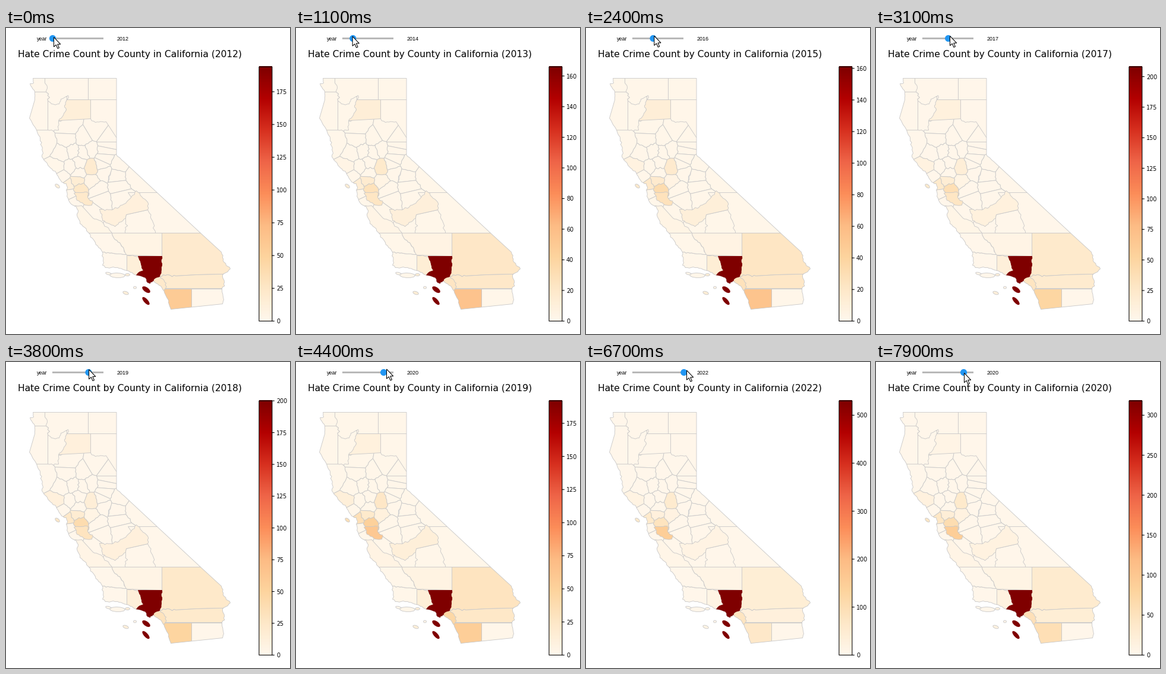
A matplotlib script that plays this animation: 478 by 514 pixels, repeating every 8000 ms.

```python
import numpy as np
import matplotlib.pyplot as plt
from matplotlib.animation import FuncAnimation
from matplotlib.patches import Circle, Polygon, Rectangle

W, H, DPI = 478, 514, 100
PX = 72 / DPI
FRAMES, INTERVAL = 80, 100
CMAP = plt.get_cmap("OrRd")
GREY = "#c9c9c9"
LINE = 0.62

fig = plt.figure(figsize=(W / DPI, H / DPI), dpi=DPI, facecolor="white")
ax = fig.add_axes([0, 0, 1, 1])
ax.axis("off")

# Counts at a few years; the ones between are interpolated.
PEAK_YEARS = [2012, 2014, 2017, 2019, 2020, 2021, 2022]
PEAKS = [194, 138, 208, 192, 318, 370, 530]
COUNT_YEARS = [2012, 2018, 2022]
COUNTS = {
    "San Diego": (57, 49, 66),
    "San Bernardino": (21, 24, 42),
    "Riverside": (20, 22, 30),
    "Orange": (22, 32, 78),
    "Ventura": (13, 13, 16),
    "Santa Clara": (22, 30, 148),
    "Alameda": (25, 40, 82),
    "Contra Costa": (16, 18, 30),
    "San Francisco": (12, 25, 60),
    "Sacramento": (19, 15, 55),
    "San Joaquin": (5, 6, 22),
    "Fresno": (11, 11, 18),
    "Shasta": (13, 11, 6),
    "Sonoma": (3, 11, 20),
    "Monterey": (4, 5, 10),
    "Kern": (6, 5, 14),
}


def roughen(points):
    """Let short edges wander; long ones are surveyed lines and stay straight."""
    points = np.round(np.asarray(points, float), 1)
    path = []
    for a, b in zip(points, np.roll(points, -1, axis=0)):
        length = np.hypot(*(b - a))
        t = np.linspace(0, 1, 2 + int(length / 3.5))[:-1, None]
        if length > 28 or length < 3:
            path.append(a[None])
            continue
        # The same edge must look alike from both sides.
        swap = tuple(a) > tuple(b)
        lo, hi = (b, a) if swap else (a, b)
        rng = np.random.default_rng(int(abs(lo @ (910, 70) + hi @ (130, 310))))
        s = np.linspace(0, 1, len(t) + 1)[:, None]
        normal = np.array([lo[1] - hi[1], hi[0] - lo[0]]) / length
        line = lo + s * (hi - lo) + normal * np.sin(np.pi * s) * rng.normal(0, 0.9, s.shape)
        path.append((line[::-1] if swap else line)[:-1])
    return np.vstack(path)


def voronoi_cell(center, centers):
    """Part of the stage nearer to center than to any other point."""
    cell = [np.array(p, float) for p in ((0, 0), (W, 0), (W, H), (0, H))]
    for other in centers:
        normal = other - center
        if not normal.any():
            continue
        side = [(p - (center + other) / 2) @ normal for p in cell]
        kept = []
        for i, p in enumerate(cell):
            q, d, e = cell[i - 1], side[i], side[i - 1]
            if d * e < 0:
                kept.append(q + (p - q) * e / (e - d))
            if d <= 0:
                kept.append(p)
        cell = kept
    return cell


state = ax.add_patch(Polygon(roughen([
    (45, 84), (185.5, 84), (185.5, 213), (200, 226), (327, 344), (362, 376),
    (365, 391), (377, 404), (364, 414), (367, 427), (363, 437), (366, 456),
    (364, 463), (277, 472), (272, 455), (262, 436), (247, 424), (242, 429),
    (236, 425), (234, 419), (220, 415), (203, 407), (180, 401), (170, 402),
    (162, 398), (163, 391), (162, 376), (146, 354), (140, 345), (124, 328),
    (119, 312), (121, 306), (118, 300), (110, 296), (105, 289), (101, 272),
    (103, 267), (101, 261), (93, 258), (84, 243), (70, 230), (60, 216),
    (62, 210), (57, 186), (51, 171), (39, 151), (48, 120), (48, 107),
    (40, 93), (46, 92)]), fill=False, ec=GREY, lw=LINE, zorder=3))
areas = []


def add_area(name, shape, on_land=True):
    patch = ax.add_patch(Polygon(shape, ec=GREY, lw=LINE, joinstyle="round", zorder=2))
    if on_land:
        patch.set_clip_path(state)
    if name == "Los Angeles":
        patch.set_zorder(4)
    areas.append((name, patch))


def county(name, *points):
    add_area(name, roughen(points))


def island(name, x, y, length, width, angle):
    turn, a = np.linspace(0, 2 * np.pi, 12)[:-1], np.radians(angle)
    u, v = length / 2 * np.cos(turn), width / 2 * np.sin(turn)
    add_area(name, np.c_[x + u * np.cos(a) - v * np.sin(a),
                         y + u * np.sin(a) + v * np.cos(a)], on_land=False)


# Small counties are cells around their centres.
CENTERS = {
    "Mendocino": (66, 195), "Lake": (94, 210), "Tehama": (105, 166),
    "Glenn": (104, 188), "Colusa": (112, 206), "Butte": (130, 186),
    "Plumas": (150, 174), "Sierra": (168, 187), "Nevada": (168, 195),
    "Placer": (166, 205), "Yuba": (141, 203), "Sutter": (130, 207),
    "El Dorado": (165, 218), "Amador": (160, 229), "Alpine": (190, 229),
    "Calaveras": (164, 242), "Tuolumne": (186, 248), "Mariposa": (188, 266),
    "Madera": (192, 283), "Merced": (160, 287), "Stanislaus": (154, 271),
    "San Joaquin": (143, 257), "Sacramento": (143, 234), "Yolo": (122, 227),
    "Solano": (121, 243), "Napa": (109, 233), "Sonoma": (85, 233),
    "Marin": (94, 250), "Contra Costa": (119, 257), "Alameda": (123, 269),
    "San Mateo": (106, 278), "San Francisco": (104, 264),
    "Santa Cruz": (113, 293), "San Benito": (145, 308),
    "Kings": (190, 328), "Mono": (216, 247),
}
spots = np.array(list(CENTERS.values()), float)
for name, spot in zip(CENTERS, spots):
    add_area(name, roughen(voronoi_cell(spot, spots)))

# Larger ones reach past the coast and are cut off by the state outline.
county("Trinity", (70, 115), (102, 115), (100, 152), (88, 156), (88, 171), (70, 171))
county("Siskiyou", (67, 70), (138, 70), (138, 120), (102, 120), (104, 113),
       (92, 119), (89, 127), (76, 127), (70, 122), (71, 110), (67, 107), (65, 92))
county("Modoc", (138, 70), (200, 70), (200, 120), (138, 120))
county("Del Norte", (20, 70), (67, 70), (65, 92), (69, 99), (67, 107), (20, 107))
county("Humboldt", (20, 107), (67, 107), (71, 110), (70, 122), (70, 171), (20, 171))
county("Shasta", (102, 120), (142, 120), (142, 152), (88, 155), (96, 146),
       (101, 137), (98, 130))
county("Lassen", (142, 120), (200, 120), (200, 183), (185, 183), (168, 157),
       (150, 158), (142, 152))
county("Santa Clara", (114, 277), (136, 275), (137, 284), (145, 290), (144, 297),
       (133, 297), (119, 289))
county("Inyo", (205, 276), (270, 276), (345, 344), (251, 344))
county("Tulare", (201, 319), (202, 313), (238, 305), (247, 326), (251, 344), (200, 344))
county("Fresno", (157, 304), (178, 305), (201, 294), (219, 273), (238, 292),
       (238, 305), (202, 313), (201, 319), (183, 333), (162, 323))
county("Monterey", (100, 300), (127, 298), (146, 319), (160, 324), (178, 344), (100, 344))
county("Santa Barbara", (140, 376), (162, 376), (180, 378), (203, 380), (203, 430), (140, 430))
county("San Luis Obispo", (120, 344), (178, 344), (183, 355), (191, 360),
       (203, 380), (180, 378), (162, 376), (130, 376))
county("Kern", (178, 344), (262, 344), (262, 383), (203, 381), (191, 360), (183, 355))
county("San Bernardino", (262, 344), (400, 344), (400, 412), (320, 414),
       (285, 416), (271, 414), (258, 417), (262, 383))
county("Imperial", (312, 437), (400, 437), (400, 500), (312, 500))
county("San Diego", (250, 437), (312, 437), (312, 500), (250, 500))
county("Riverside", (258, 417), (271, 414), (285, 416), (320, 414), (400, 412),
       (400, 437), (268, 437))
county("Orange", (250, 420), (258, 417), (269, 428), (268, 437), (262, 446), (240, 432))
county("Ventura", (203, 381), (222, 384), (228, 400), (235, 420), (203, 420))
county("Los Angeles", (222, 383), (262, 383), (261, 405), (258, 417), (250, 420),
       (246, 427), (242, 436), (215, 420), (222, 411), (231, 407), (228, 400))

island("San Francisco", 86, 265, 9, 5, 40)
island("Santa Barbara", 172, 412, 10, 4, 15)
island("Santa Barbara", 187, 415, 26, 8, 2)
island("Ventura", 204, 414, 8, 4, 0)
island("Ventura", 201, 444.5, 10, 5, 20)
island("Santa Barbara", 216.5, 435.5, 5, 4, 0)
island("Los Angeles", 235.5, 439, 15, 7, 36)
island("Los Angeles", 235, 458, 16, 6, 48)

# Colour bar
LEFT, RIGHT, TOP, BOTTOM = 425.4, 447.4, 64.7, 491.8
ax.imshow(np.linspace(1, 0, 256)[:, None], cmap=CMAP, aspect="auto",
          extent=(LEFT, RIGHT, BOTTOM, TOP))
ax.add_patch(Rectangle((LEFT, TOP), RIGHT - LEFT, BOTTOM - TOP, fill=False,
                       ec="black", lw=0.77, snap=False))
ticks = [(ax.plot([], [], color="black", lw=0.77, snap=False)[0],
          ax.text(0, 0, "", fontsize=9.7 * PX, va="center_baseline",
                  family="DejaVu Sans"))
         for _ in range(10)]
title = ax.text(208, 48.5, "", fontsize=15.5 * PX, ha="center",
                va="baseline", family="DejaVu Sans")

# Slider, pointer and busy ring
label = dict(fontsize=9 * PX, va="baseline", family="Liberation Sans")
ax.text(51.5, 20.5, "year", **label)
readout = ax.text(186, 20.5, "", **label)
ax.add_patch(Rectangle((78, 15.6), 86, 2.8, fc="#b8b8b8", lw=0))
knob = ax.add_patch(Circle((78, 17), 5.6, fc="#2196f3", lw=0, zorder=5))
ring = ax.add_patch(Circle((0, 0), 5.6, fc="white", ec="#2f8de0", lw=3.2, zorder=6))
ARROW = 1.04 * np.array([(0, 0), (0, 15.5), (3.6, 12.2), (6.2, 18.2),
                         (8.6, 17.1), (6, 11.3), (10.8, 11.3)])
pointer = ax.add_patch(Polygon(ARROW, fc="white", ec="black", lw=0.75, zorder=7))

ax.set_xlim(-0.5, W - 0.5)
ax.set_ylim(H - 0.5, -0.5)

# Time, x and y of the pointer at its turning points
POINTER = np.transpose([
    (200, 80, 15), (1800, 106, 12.5), (3100, 124, 13), (4400, 152, 11.5),
    (5200, 161, 11.5), (6000, 170, 13), (6700, 169, 13.5), (7000, 160, 16),
    (7300, 160, 16), (7900, 148, 18)])


def year_at(t, start, pace, turns):
    """Climb one year per pace up to 2022, then drop one at each turn."""
    climbed = np.clip(1 + (t - start) // pace, 0, 10)
    return int(2012 + climbed - sum(t >= turn for turn in turns))


def show_scale(peak):
    step = next(s for s in (20, 25, 50, 100) if peak / s <= 9)
    for i, (mark, text) in enumerate(ticks):
        value = i * step
        y = BOTTOM - (BOTTOM - TOP) * value / peak
        mark.set_data([RIGHT, RIGHT + 3.4], [y, y])
        text.set_position((RIGHT + 7, y))
        text.set_text(str(value))
        for part in (mark, text):
            part.set_visible(value <= peak)


def share(name, year, peak):
    if name == "Los Angeles":
        return 1.0
    return float(np.interp(year, COUNT_YEARS, COUNTS.get(name, (2, 2, 5)))) / peak


def update(frame):
    t = frame * INTERVAL
    chosen = year_at(t, 400, 555, (6800, 7400))
    shown = year_at(t, 1100, 500, (7300, 7800))

    knob.center = (78 + 8.63 * (chosen - 2012), 17)
    readout.set_text(str(chosen))
    title.set_text(f"Hate Crime Count by County in California ({shown})")
    peak = round(np.interp(shown, PEAK_YEARS, PEAKS))
    show_scale(peak)
    for name, patch in areas:
        color = CMAP(share(name, shown, peak))
        patch.set_facecolor(color)
        if name == "Los Angeles":
            patch.set_edgecolor(color)

    tip = np.array([np.interp(t, POINTER[0], track) for track in POINTER[1:]])
    pointer.set_xy(ARROW + tip)
    ring.center = tuple(tip + (14.5, 1))
    ring.set_visible(1700 <= t < 2100)
    return []


anim = FuncAnimation(fig, update, frames=FRAMES, interval=INTERVAL,
                     repeat=True, repeat_delay=0, blit=False)
plt.show()
```
